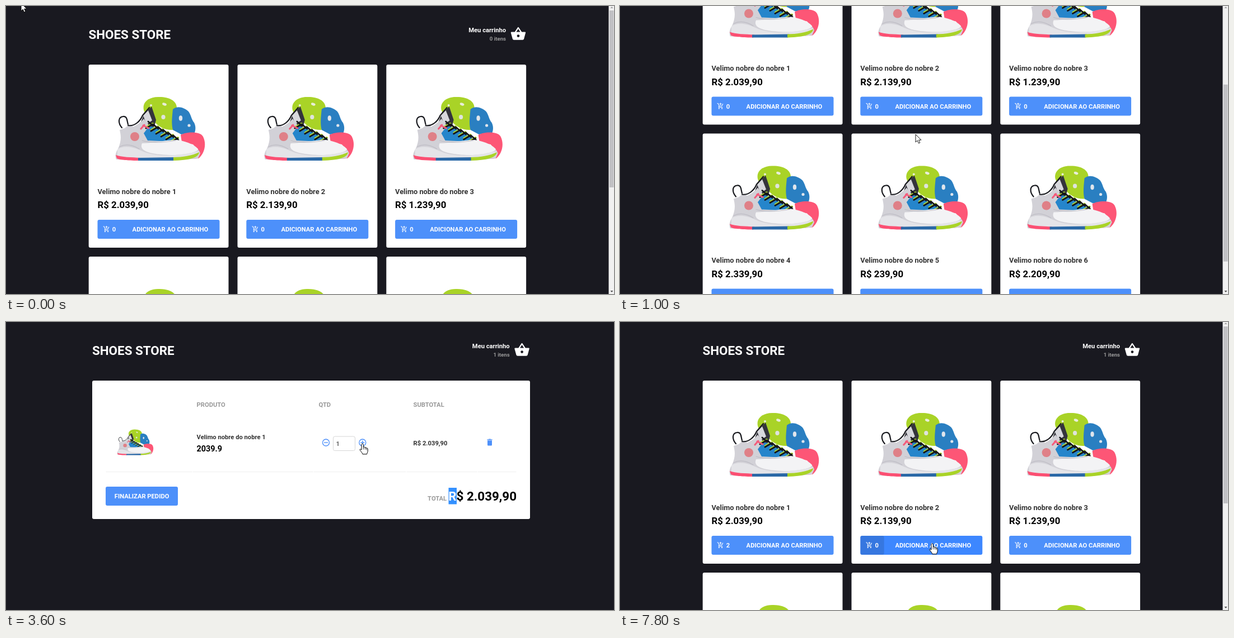
Write an HTML page that moves like this. It is 1086x516 px and loops after 8000 ms.

```html
<!DOCTYPE html>
<html lang="pt">
<head>
<meta charset="utf-8">
<title>Shoes store</title>
<style>
  html, body { margin: 0; width: 100%; height: 100%; overflow: hidden; background: #191920; }
  svg { display: block; width: 1086px; height: 516px; }
  text { font: 700 11.2px Roboto, sans-serif; white-space: pre; }
</style>
</head>
<body>
<svg id="stage" viewBox="0 0 1086 516"></svg>
<script>
const BLUE = '#4d90fa', HOVER = '#3d87ff', SHIFT = 6.6;
const prices = ['2.039,90', '2.139,90', '1.239,90', '2.339,90', '239,90', '2.209,90'];
const totals = ['2.039,90', '4.079,80', '6.119,70'];

const label = (x, y, str, fill, size = 11.2, extra = '') =>
  `<text x="${x}" y="${y}" fill="${fill}" style="font-size:${size}px" ${extra}>${str}</text>`;
const rect = (x, y, w, h, fill, r = 0, extra = '') =>
  `<rect x="${x}" y="${y}" width="${w}" height="${h}" rx="${r}" fill="${fill}" ${extra}/>`;
const path = (d, fill, extra = '') => `<path d="${d}" fill="${fill}" ${extra}/>`;
const line = (d, stroke, w) => path(d, 'none', `stroke="${stroke}" stroke-width="${w}" stroke-linecap="round" stroke-linejoin="round"`);
const dot = (x, y, rx, ry, fill, turn = 0) =>
  `<ellipse cx="${x}" cy="${y}" rx="${rx}" ry="${ry}" fill="${fill}" transform="rotate(${turn} ${x} ${y})"/>`;
const END = 'text-anchor="end"', MID = 'text-anchor="middle"';

const icons = {
  basket: 'M17.2 9l-4.4-6.56a1 1 0 0 0-1.66 0L6.8 9H2a1 1 0 0 0-1 1.27l2.54 9.27A2 2 0 0 0 5.5 21h13a2 2 0 0 0 1.93-1.46L23 10a1 1 0 0 0-1-1zM9 9l3-4.4L15 9zm3 8a2 2 0 1 1 0-4 2 2 0 0 1 0 4z',
  cart: 'M11 9h2V6h3V4h-3V1h-2v3H8v2h3zM7 18a2 2 0 1 0 0 4 2 2 0 0 0 0-4zm10 0a2 2 0 1 0 0 4 2 2 0 0 0 0-4zm-9.8-3.3l.9-1.7h7.45c.75 0 1.4-.4 1.75-1.03l3.86-7L19.4 4l-3.85 7H8.5L4.27 2H1v2h2l3.6 7.6-1.35 2.4A2 2 0 0 0 7 17h12v-2H7.4z',
  trash: 'M6 19a2 2 0 0 0 2 2h8a2 2 0 0 0 2-2V7H6zM19 4h-3.5l-1-1h-5l-1 1H5v2h14z'
};
const icon = (name, x, y, size, fill) => path(icons[name], fill, `transform="translate(${x} ${y}) scale(${size / 24})"`);

function shoe() {
  const laces = [0, 1, 2, 3, 4, 5].map(i => {
    const x = 251 + i * 9, y = 211 + i * 5;
    return line(`M${x} ${y + 6}l11-6`, '#b4dc2f', 4) + line(`M${x + 3} ${y - 4}l9 8M${x - 1} ${y + 8}l12-7`, '#15161a', 2.8);
  }).join('');
  return path('M246 186C243 172 256 162 274 163c18 0 30 7 31 18-2 14-7 26-7 41-12 1-26-5-34-16-6-9-16-11-18-20z', '#a9d327')
    + path('M298 185c9-7 20-3 28 4 5 7 5 14 10 20 3 6 3 12 1 18l-24 3-15-8c-3-12-1-25 0-37z', '#2a7fc1')
    + path('M312 231c10-6 35-7 40 3 7 14 2 31-8 39l-14 1c10-8 11-19 4-26l-20-4z', '#fd5676')
    + dot(259, 178, 2, 2, '#e9eed8') + dot(283, 176, 4, 2.3, '#e9eed8', 20) + dot(281, 199, 3.6, 4, '#dfe3dd')
    + dot(312, 201, 3.2, 4.8, '#dfe5ec') + dot(327, 214, 2.6, 2.6, '#dfe5ec')
    + path('M247 193l13-13 8 24-3 12-20 4-5-10z', '#34343c')
    + path('M245 196l9-9 7 18-10 7z', '#d8d8dd')
    + path('M203 222l9-3c6-6 10-4 16-3 8-4 13-8 18-14l8 10 6 8c16 10 34 16 52 22 14 4 32 10 35 22l-4 9-43 4-103-2c-3-6-1-13 3-19 6-13 6-22 3-34z', '#d2d1d7')
    + path('M246 228l10-13 12 3 43 24-14 1-44-2z', '#2585cb')
    + laces
    + path('M243 246c20 0 40-6 62-6 12 1 30 7 38 16 2 6-30 14-66 10-20-2-40-6-34-20z', '#f3f3f5')
    + path('M199 257c10-8 28-5 42 2 26 12 60 11 104 1-1 10-20 13-48 13l-98-2z', '#e4e4e8')
    + line('M203 252c10-5 22-4 35 4m5-15c18 6 42 3 60 0', '#bebdc5', 1.2)
    + line('M207 218c-7-8-7-19 2-20 8-1 7 8 9 14m0 2c12 2 22-8 26-18l12-14', '#191a1f', 2.2)
    + line('M241 220l6-7m-2 1l10 5', '#f45b7b', 3)
    + dot(230, 234, 8, 8, '#df8087')
    + path('M196 267c10 4 28 4 44 5l-2 5c-16 0-36-1-40-4z', '#fb4f72')
    + path('M236 272l66-1-2 6h-64z', '#2a68a6')
    + path('M299 271c16 0 34-3 46-9-1 9-14 14-46 15z', '#a9d327');
}

const header = id => label(147.4, 58.5, 'SHOES STORE', '#fff', 22.4)
  + label(893, 46.5, 'Meu carrinho', '#fff', 11.2, END)
  + label(893, 62, '0 itens', '#999', 9.6, `${END} id="${id}"`)
  + icon('basket', 900.6, 35.6, 28.8, '#fff');

function card(price, i) {
  return `<g transform="translate(${147.7 + i % 3 * 265.8} ${105 + (i / 3 | 0) * 344})">`
    + rect(0, 0, 249.8, 328, '#fff', 3)
    + '<use href="#shoe" x="-147.7" y="-105"/>'
    + label(15.8, 231.6, `Velimo nobre do nobre ${i + 1}`, '#333', 12.8)
    + label(15.8, 257, 'R$ ' + price, '#000', 16.8)
    + rect(15.8, 278, 218, 34, BLUE, 3, `id="buy${i}"`)
    + rect(15.8, 278, 42.4, 34, 'rgba(0,0,0,.12)', 3, `id="tint${i}"`)
    + icon('cart', 25.4, 288.4, 12.8, '#fff')
    + label(42, 299, '0', '#fff', 11.2, `id="count${i}"`)
    + label(145.8, 299, 'ADICIONAR AO CARRINHO', '#fff', 11.2, MID) + '</g>';
}

const ring = (x, bars) => `<circle cx="${x}" cy="216" r="6" fill="none" stroke="${BLUE}" stroke-width="1.35"/>`
  + path(bars, 'none', `stroke="${BLUE}" stroke-width="1.35"`);

const store = `<g id="store"><g id="scroll">${header('items0')}${prices.map(card).join('')}</g>`
  + rect(1076.5, 0, 9.5, 516, '#f1f1f1')
  + rect(1078, 8, 7.5, 317, '#c1c1c4', 0, 'id="thumb"')
  + path('M1079.5 4l2.5-3 2.5 3z', '#a3a3a3') + path('M1079.5 510l2.5 3 2.5-3z', '#505050') + '</g>';

const cart = `<g id="cart"><g transform="translate(${SHIFT} 0)">${header('items1')}</g>`
  + rect(154, 105, 782, 248, '#fff', 3)
  + label(340.6, 152, 'PRODUTO', '#999') + label(558.4, 152, 'QTD', '#999') + label(727.6, 152, 'SUBTOTAL', '#999')
  + '<use href="#shoe" transform="translate(119.7 126.6) scale(.404)"/>'
  + label(340.6, 210, 'Velimo nobre do nobre 1', '#333') + label(340.6, 232.4, '2039.9', '#000', 14.4)
  + ring(571.5, 'M568 216h7') + ring(636.8, 'M633.3 216h7m-3.5-3.5v7')
  + rect(584.5, 205, 39, 25.5, '#fff', 3, 'stroke="#d6d6d6"')
  + label(589.6, 222, '1', '#666', 11.2, 'id="qty"')
  + label(727.6, 221, '', '#333', 11.2, 'id="sub"')
  + icon('trash', 856, 207.6, 16, BLUE)
  + line('M179 268.5H332m2 0H548m2 0H714m2 0H841m2 0H911', '#eee', 1)
  + rect(178, 295, 129, 34, BLUE, 3) + label(242.6, 316.4, 'FINALIZAR PEDIDO', '#fff', 11.2, MID)
  + label(787, 320.4, 'TOTAL', '#999', 11.2, END)
  + rect(790.5, 297, 14.5, 29.5, '#3390ff', 0, 'id="mark"')
  + `<text x="912" y="320.4" ${END} style="font-size:22.4px"><tspan id="cur">R</tspan><tspan id="sum"></tspan></text>`
  + '<g id="status">' + rect(-4, 503, 365, 18, '#dee1e6', 3)
  + label(4, 514, 'Conectando...', '#3c4043', 9.6, 'font-family="Open Sans"') + '</g></g>';

const arrow = path('M0 0V14l3.2-3 2.2 5 2.4-1-2.2-4.9H10z', '#fff', 'id="arrow" stroke="#000" stroke-width=".9"');
const hand = path('M-2 1.5C-2-.3 1.4-.3 1.4 1.5V6c1.4-.5 2.7 0 3 1 1.2-.5 2.3 0 2.6 1 1.4-.3 2.2.5 2.2 1.8V13c0 2.4-1.4 3.4-1.6 5.8H0c-.4-2.2-3-4.6-4.8-7.4-.8-1.6 1-2.4 2.8-.2z',
  '#fff', 'id="hand" stroke="#000"') + line('M1.4 6v4m3-3v3m2.6-2v3', '#000', .8);

const $ = id => document.getElementById(id);
$('stage').innerHTML = `<defs><g id="shoe">${shoe()}</g></defs>` + rect(0, 0, 1086, 516, '#191920')
  + store + cart + `<g id="pointer">${arrow}<g id="grip">${hand}</g></g>`;

// Keys are [time, value, ...]; values run linearly between them.
const pointerKeys = [
  [0, 27, -5], [200, 130, 45], [600, 461, 200], [1000, 528, 230], [1200, 480, 270], [1500, 325, 385], [1700, 303, 400],
  [1800, 303, 400], [1900, 304, 399], [2200, 304, 399], [2400, 308, 396], [2600, 308, 396], [2800, 545, 328], [2900, 545, 328],
  [3300, 648, 206], [3600, 637, 218], [4800, 637, 218], [5300, 423, 230], [5600, 572, 213], [5800, 572, 213],
  [6300, 384, 230], [6600, 269, 90], [6800, 255, 50], [7000, 255, 50], [7300, 275, 186], [7500, 569, 397],
  [7600, 555, 397], [7700, 555, 397], [7800, 558, 397]
];
const scrollKeys = [[200, 0], [600, 136], [1000, 220.5], [1100, 235], [1200, 205], [1500, 0]];
const statusKeys = [[2200, 0], [2300, .9], [2500, .7], [2600, .25], [2700, 0]];
const gripSpans = [[1500, 2300], [3500, 4900], [5600, 5900], [6700, 7100], [7500, 8000]];

function at(keys, t, k = 1) {
  const n = keys.findIndex(key => key[0] > t);
  if (n < 0) return keys[keys.length - 1][k];
  if (!n) return keys[0][k];
  const a = keys[n - 1], b = keys[n];
  return a[k] + (b[k] - a[k]) * (t - a[0]) / (b[0] - a[0]);
}
const show = (id, on) => $(id).setAttribute('display', on ? 'inline' : 'none');

function draw(t) {
  const inCart = t >= 2200 && t < 7000, back = t >= 7000;
  show('store', !inCart);
  show('cart', inCart);

  const y = at(scrollKeys, t);
  $('scroll').setAttribute('transform', `translate(0 ${-y})`);
  $('thumb').setAttribute('y', 8 + y * .602);
  $('items0').textContent = back ? '1 itens' : '0 itens';
  $('items1').textContent = '1 itens';
  $('count0').textContent = back ? 2 : 0;
  const hot = t >= 7500 ? 1 : t >= 1500 && t < 2200 ? 0 : -1;
  prices.forEach((_, i) => {
    $('buy' + i).setAttribute('fill', i === hot ? HOVER : BLUE);
    show('tint' + i, i === hot);
  });

  const qty = t < 3800 ? 1 : t < 4800 ? 2 : t < 5800 ? 3 : 2;
  $('qty').textContent = qty;
  $('sub').textContent = 'R$ ' + totals[qty - 1];
  $('sum').textContent = '$ ' + totals[qty - 1];
  show('mark', t < 3800);
  $('cur').setAttribute('fill', t < 3800 ? '#fff' : '#000');
  $('status').setAttribute('opacity', at(statusKeys, t));

  const grip = gripSpans.some(([a, b]) => t >= a && t < b);
  show('arrow', !grip);
  show('grip', grip);
  $('pointer').setAttribute('transform', `translate(${at(pointerKeys, t)} ${at(pointerKeys, t, 2)})`);
}

const start = performance.now();
function tick() {
  const t = (performance.now() - start) % 8000;
  draw(Math.floor(t / 100) * 100);
  requestAnimationFrame(tick);
}
tick();
</script>
</body>
</html>
```
